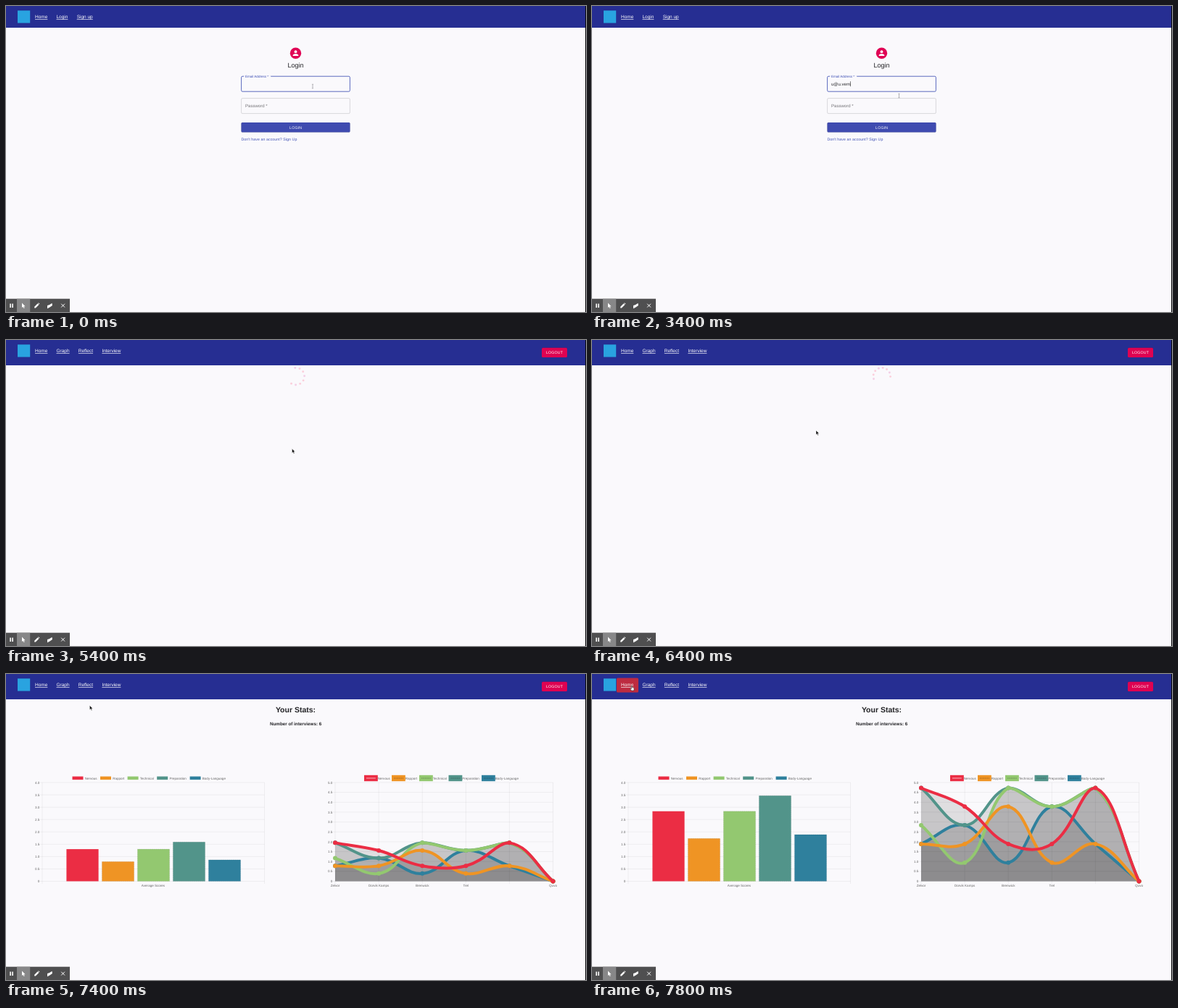
Animation, 800 px wide and 423 px high, one loop 8000 ms. Source, as an HTML page:

```html
<!DOCTYPE html>
<html lang="en">
<head>
<meta charset="utf-8">
<title>Interview stats</title>
<style>
  html, body { margin: 0; width: 100%; height: 100%; overflow: hidden; background: #faf9fc; }
  svg { display: block; width: 100vw; height: 100vh; }
  text { font-family: "Liberation Sans", Arial, sans-serif; text-rendering: geometricPrecision; fill: #232326; }
  .nav text { font-size: 6.5px; fill: #fff; text-decoration: underline; }
  .mid { text-anchor: middle; }
  .btn { font-size: 5.28px; letter-spacing: .0286em; fill: #fff; text-anchor: middle; }
  .drop { filter: drop-shadow(0 .7px .7px rgba(0, 0, 0, .35)); }
  .field .box { fill: none; stroke: #c2c1c4; stroke-width: .6; }
  .field .label { font-size: 6.05px; fill: #757478; }
  .field .value { font-size: 6.05px; fill: #2a2a2d; }
  .field .notch { fill: #faf9fc; visibility: hidden; }
  .field.float .notch { visibility: visible; }
  .field.float .label { font-size: 4.54px; }
  .field.focus .box { stroke: #3f51b5; stroke-width: .85; }
  .field.focus .label { fill: #3f51b5; }
  .chart text { font-size: 4.55px; fill: #666; }
  .chart .grid { stroke: rgba(0, 0, 0, .1); stroke-width: .5; fill: none; }
  .end { text-anchor: end; }
</style>
</head>
<body>
<svg id="stage" viewBox="0 0 800 423" preserveAspectRatio="none">
  <rect width="800" height="423" fill="#faf9fc"/>
  <rect id="bar" width="800" height="30" fill="#262e92"/>
  <rect id="hover" x="34" y="5.5" width="30" height="20" rx="1.5" fill="#bd2b40"/>
  <rect x="16" y="6.3" width="17.2" height="17.2" fill="#29a3e0"/>

  <g id="login">
    <g class="nav"><text x="40" y="17.2">Home</text><text x="69.5" y="17.2">Login</text><text x="97.7" y="17.2">Sign up</text></g>
    <circle cx="399.5" cy="65.2" r="7.7" fill="#e00555"/>
    <circle cx="399.5" cy="63.2" r="1.9" fill="#fff"/>
    <path d="M395.7 69v-.9c0-1.3 2.5-2 3.8-2s3.8.7 3.8 2v.9z" fill="#fff"/>
    <text class="mid" x="399.6" y="85.2" font-size="9.06">Login</text>
    <g id="fields"></g>
    <rect id="submit" class="drop" x="324.5" y="161" width="150" height="13.4" rx="1.5" fill="#3f4bb0"/>
    <text class="btn" x="399.7" y="169.5">LOGIN</text>
    <text x="324.4" y="185.8" font-size="5.28" letter-spacing=".056" style="fill:#3f51b5">Don't have an account? Sign Up</text>
  </g>

  <g id="home">
    <g class="nav"><text x="40" y="17.2">Home</text><text x="69.5" y="17.2">Graph</text><text x="99.8" y="17.2">Reflect</text><text x="132.4" y="17.2">Interview</text></g>
    <rect class="drop" x="739" y="10.8" width="35" height="13.2" rx="1.5" fill="#de0352"/>
    <text class="btn" x="756.6" y="19.2">LOGOUT</text>
    <g id="spinner"></g>
    <g id="stats">
      <text class="mid" x="399.5" y="53.2" font-size="10.5" font-weight="bold">Your Stats:</text>
      <text class="mid" x="399.6" y="70.6" font-size="6.31" font-weight="bold">Number of interviews: 6</text>
      <g id="averages" class="chart"></g>
      <g id="history" class="chart"></g>
    </g>
  </g>

  <rect x="799" width="1" height="423" fill="#08080c"/>

  <g id="tools">
    <rect y="404.7" width="88" height="18.3" fill="#4f4f50"/>
    <rect x="15" y="404.7" width="18.2" height="18.3" fill="#878788"/>
    <g fill="#fff">
      <path d="M5.3 411.6h1.6v5.4h-1.6zM8.3 411.6h1.6v5.4h-1.6z"/>
      <path d="M22 410.4v6.6l1.6-1.3 1 2.2 1-.4-1-2.2h2z"/>
      <path d="M39.2 417.4v-1.6l4.5-4.5 1.6 1.6-4.5 4.5zM44.2 410.8l.7-.6 1.6 1.6-.7.6z"/>
      <path d="M57 418.2v-4.2l3-1 3.5-2.3.4 3.2-3.6 2.6z"/>
    </g>
    <path d="M76.2 411.7l4.8 4.8m0-4.8l-4.8 4.8" stroke="#fff" stroke-width="1"/>
  </g>

  <g id="cursor">
    <path id="ibeam" d="M-1.1 -2.8h.8l.3.3.3-.3h.8M0-2.5v5M-1.1 2.8h.8l.3-.3.3.3h.8" fill="none" stroke="#77777c" stroke-width=".55"/>
    <path id="arrow" d="M0 0v5.9l1.4-1.2 1 2.2 1-.4-1-2.2h1.9z" fill="#111" stroke="#fff" stroke-width=".45"/>
    <path id="hand" d="M-.5 0q.6-.6 1.1 0v2.5l2.4.6q.5.2.4.8l-.5 2.8h-3.3l-2-2.8q.3-.8 1.1-.2l.8.6z" fill="#fff" stroke="#111" stroke-width=".5"/>
  </g>
</svg>
<script>
const LOOP = 8000, STEP = 200;
const SIGNED_IN = 5000, LOADED = 7400;
const $ = id => document.getElementById(id);

function add(parent, tag, attrs = {}, text = '') {
  const node = document.createElementNS('http://www.w3.org/2000/svg', tag);
  for (const key in attrs) node.setAttribute(key, attrs[key]);
  node.textContent = text;
  return parent.appendChild(node);
}
const show = (id, on) => $(id).style.display = on ? '' : 'none';
const latest = (table, t) => table.filter(([time]) => time <= t).pop()[1];

// Login form
function makeField(label, y, notchWidth) {
  const root = add($('fields'), 'g', { class: 'field' });
  add(root, 'rect', { class: 'box', x: 324.6, y, width: 149.8, height: 21, rx: 1.6 });
  add(root, 'rect', { class: 'notch', x: 328.2, y: y - 1, width: notchWidth, height: 2 });
  const title = add(root, 'text', { class: 'label', x: 330 }, label);
  const value = add(root, 'text', { class: 'value', x: 330, y: y + 12.7 });
  const caret = add(root, 'rect', { y: y + 7, width: .6, height: 7, fill: '#222' });
  return (text, focus, caretOn) => {
    const float = focus || text;
    root.setAttribute('class', 'field' + (focus ? ' focus' : '') + (float ? ' float' : ''));
    title.setAttribute('y', y + (float ? 1.7 : 12.7));
    value.textContent = text;
    caret.setAttribute('x', 330.1 + (text ? value.getComputedTextLength() : 0));
    caret.style.display = focus && caretOn ? '' : 'none';
  };
}
const email = makeField('Email Address *', 97.2, 37);
const password = makeField('Password *', 127.6, 27);

const EMAIL = 'u@u.vem';
const EMAIL_LENGTH = [[0, 0], [1400, 1], [1600, 3], [2000, 4], [2200, 5], [2400, 6], [2600, 7]];
const FOCUS_PASSWORD = 3600, TYPE_PASSWORD = 4200;

function drawLogin(t) {
  const onPassword = t >= FOCUS_PASSWORD;
  const typing = t >= 1400 && t <= 2600 || onPassword;
  const caretOn = typing || Math.floor(t / 600) % 2 === 1;
  email(EMAIL.slice(0, latest(EMAIL_LENGTH, t)), !onPassword, caretOn);
  password(t >= TYPE_PASSWORD ? '•' : '', onPassword, caretOn);
  $('submit').setAttribute('fill', t >= 4600 ? '#303f9f' : '#3f4bb0');
}

// Loading ring
const dots = Array.from({ length: 8 }, (_, i) =>
  add($('spinner'), 'circle', { r: 1.45, fill: i % 3 === 1 ? '#f3cfe6' : '#fbcfdb' }));

function drawSpinner(t) {
  const since = t - 5400;
  const head = 122 + since * .24;
  const gap = 26 + 5 * Math.cos(since / 600 * Math.PI);
  dots.forEach((dot, i) => {
    const angle = (head - i * gap) * Math.PI / 180;
    dot.setAttribute('cx', 399.8 + 11.8 * Math.cos(angle));
    dot.setAttribute('cy', 50.2 + 11.8 * Math.sin(angle));
  });
}

// Charts
const BASE = 286.5, TOP = 150;
const SERIES = [
  { name: 'Nervous', color: '#eb2d44', scores: [5, 4, 2, 2, 5, 0], keys: [91.5, 494] },
  { name: 'Rapport', color: '#ef9424', scores: [2, 2, 4, 1, 2, 0], keys: [130, 532] },
  { name: 'Technical', color: '#93c870', scores: [3, 1, 5, 4, 5, 0], keys: [167.6, 570] },
  { name: 'Preparation', color: '#52948a', scores: [5, 3, 5, 4, 5, 0], keys: [208.2, 610.5] },
  { name: 'Body-Language', color: '#2f809d', scores: [2, 3, 1, 4, 2, 0], keys: [253.6, 656] },
];
const COMPANIES = ['Zelvor', 'Dorvik Kamps', 'Brenwick', 'Trel', '', 'Quvo'];
const averages = $('averages'), history6 = $('history');
const pointX = i => 454 + 60.1 * i;

function drawGrid(parent, left, right, max, columns) {
  for (let v = 0; v <= max; v += .5) {
    const y = BASE - v / max * (BASE - TOP);
    add(parent, 'path', { class: 'grid', d: `M${left - 3.5} ${y}H${right}` });
    add(parent, 'text', { class: 'end', x: left - 3.6, y: y + 1.6 }, v ? v.toFixed(1) : '0');
  }
  for (const x of columns) add(parent, 'path', { class: 'grid', d: `M${x} ${TOP}V${BASE + 3.5}` });
}

drawGrid(averages, 50, 356.5, 4, [50, 356.5]);
add(averages, 'text', { class: 'mid', x: 203, y: 294.4 }, 'Average Scores');
drawGrid(history6, 454, 754.5, 5, COMPANIES.map((_, i) => pointX(i)));
COMPANIES.forEach((name, i) => add(history6, 'text', { class: 'mid', x: pointX(i), y: 294.4 }, name));

const fills = add(history6, 'g', { fill: 'rgba(0,0,0,.11)' });
const lines = add(history6, 'g', { fill: 'none', 'stroke-width': 4 });

SERIES.forEach((s, i) => {
  const [barKey, lineKey] = s.keys;
  const dash = i ? { stroke: 'rgba(0,0,0,.3)', 'stroke-width': .4, 'stroke-dasharray': '.8 .8' } : {};
  add(averages, 'rect', { x: barKey, y: 141.6, width: 15, height: 4.5, fill: s.color });
  add(averages, 'text', { x: barKey + 17.2, y: 145.6 }, s.name);
  s.bar = add(averages, 'rect', { x: 83.4 + 49 * i, width: 44.2, fill: s.color, ...dash });

  add(history6, 'rect', { x: lineKey, y: 139.8, width: 18.8, height: 8.4, fill: s.color });
  add(history6, 'path', {
    d: `M${lineKey + 3} 144h12.8`, 'stroke-width': .8,
    stroke: i ? 'rgba(0,0,0,.45)' : '#fbd5da', 'stroke-dasharray': i ? '1 .7' : 'none',
  });
  add(history6, 'text', { x: lineKey + 18.8, y: 145.6 }, s.name);
});
// The first series lies on top.
for (const s of [...SERIES].reverse()) {
  s.area = add(fills, 'path');
  s.line = add(lines, 'path', { stroke: s.color });
  s.points = s.scores.map((_, i) => add(lines, 'circle', { cx: pointX(i), r: 3, fill: s.color }));
}

function curve(scores, yOf) {
  const pts = scores.map((v, i) => [pointX(i), v]);
  const handles = pts.map(([x, v], i) => {
    const a = pts[i - 1] || pts[i], b = pts[i + 1] || pts[i];
    const before = Math.hypot(x - a[0], (v - a[1]) * 27.3);
    const after = Math.hypot(b[0] - x, (b[1] - v) * 27.3);
    const at = k => [x + k * (b[0] - a[0]), Math.min(5, Math.max(0, v + k * (b[1] - a[1])))];
    return [at(-.4 * before / (before + after)), at(.4 * after / (before + after))];
  });
  const xy = ([x, v]) => `${x} ${yOf(v)}`;
  return 'M' + xy(pts[0]) + pts.slice(1).map((p, i) =>
    `C${xy(handles[i][1])} ${xy(handles[i + 1][0])} ${xy(p)}`).join('');
}

const easeOutQuart = x => 1 - (1 - Math.min(1, Math.max(0, x))) ** 4;

function drawCharts(t) {
  const barGrow = easeOutQuart((t - 7262) * .00096);
  const lineGrow = easeOutQuart((t - 7284) / 1000);
  const yOf = v => BASE - v * lineGrow * (BASE - TOP) / 5;
  for (const s of SERIES) {
    const mean = s.scores.reduce((a, b) => a + b) / s.scores.length;
    const height = mean * barGrow * (BASE - TOP) / 4;
    s.bar.setAttribute('y', BASE - height);
    s.bar.setAttribute('height', height);
    const d = curve(s.scores, yOf);
    s.line.setAttribute('d', d);
    s.area.setAttribute('d', `${d}V${BASE}H${pointX(0)}z`);
    s.points.forEach((p, i) => p.setAttribute('cy', yOf(s.scores[i])));
  }
}

// Pointer
const PATH = [
  [0, 423, 111], [3200, 423, 111], [3600, 424, 137], [4000, 424, 148], [4400, 424, 160],
  [4600, 425, 165], [5000, 424, 165], [5400, 394.5, 150.3], [6000, 393, 150], [6800, 225, 100],
  [7200, 148.2, 73.8], [7400, 115.4, 43.5], [7600, 76, 27], [7800, 54.8, 16.2], [8000, 54.8, 16.2],
];
const POINTER = [[0, 'ibeam'], [4200, 'arrow'], [4600, 'hand'], [5000, 'arrow'], [7800, 'hand']];

function drawPointer(t) {
  const next = PATH.findIndex(([time]) => time > t);
  const [t0, x0, y0] = PATH[next - 1], [t1, x1, y1] = PATH[next];
  const k = (t - t0) / (t1 - t0);
  $('cursor').setAttribute('transform', `translate(${x0 + (x1 - x0) * k} ${y0 + (y1 - y0) * k})`);
  for (const kind of ['ibeam', 'arrow', 'hand']) show(kind, kind === latest(POINTER, t));
}

function draw(t) {
  const inside = t >= SIGNED_IN, loaded = t >= LOADED;
  $('bar').setAttribute('height', inside ? 35 : 30);
  show('login', !inside);
  show('home', inside);
  show('spinner', !loaded);
  show('stats', loaded);
  show('hover', t >= 7800);
  if (!inside) drawLogin(t);
  else if (!loaded) drawSpinner(t);
  else drawCharts(t);
  drawPointer(t);
}

const start = performance.now();
let drawn = -1;
function tick() {
  const elapsed = (performance.now() - start) % LOOP;
  const t = Math.floor(elapsed / STEP) * STEP;
  if (t !== drawn) draw(drawn = t);
  requestAnimationFrame(tick);
}
tick();
</script>
</body>
</html>
```
